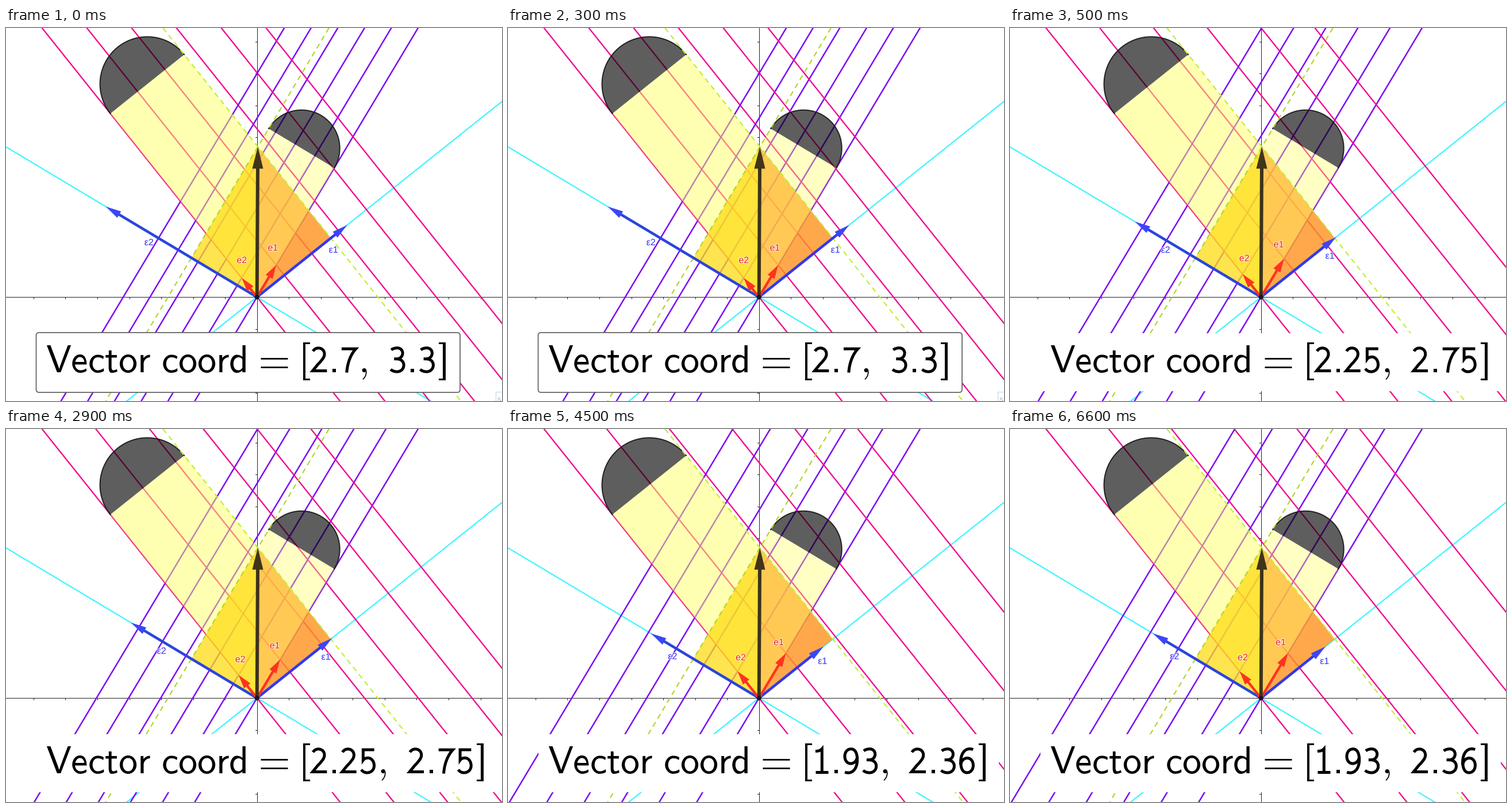
These frames come from a looping animation (863x649 px, 8 s). A matplotlib script:

```python
import numpy as np
import matplotlib.pyplot as plt
from matplotlib.animation import FuncAnimation
from matplotlib.patches import (Circle, FancyBboxPatch, PathPatch, Polygon,
                                Rectangle, Wedge)
from matplotlib.path import Path
from matplotlib.patheffects import withStroke

W, H, DPI = 863, 649, 64
PT = 72 / DPI                     # points per pixel
UNIT = 55.55                      # pixels per axis unit
EM = 66                           # size of the caption
BASE = 599                        # baseline of the caption

plt.rcParams["mathtext.fontset"] = "cm"

O = np.array([436.7, 468.2])
V = np.array([1.5, -261.5])
# Basis at scale 1 and its dual, in screen directions
EPS1, EPS2 = np.array([157, -125.4]), np.array([-263, -157.4])
DUAL = 0.2122
E1 = DUAL * np.array([-EPS2[1], EPS2[0]])
E2 = DUAL * np.array([EPS1[1], -EPS1[0]])

PINK, PURPLE, CYAN = "#f2058f", "#7a0bf5", "#3df6ff"

# Pen strokes of the sans digits in 1/1000 em: a pair is a line, six are a curve
SIX = [[(412, 625), (380, 640, 350, 643, 320, 643), (180, 643, 85, 500, 85, 300),
        (85, 130, 140, 16, 250, 16), (350, 16, 415, 100, 415, 210),
        (415, 320, 350, 400, 260, 400), (165, 400, 95, 320, 87, 230)]]
DIGITS = {
    "1": [[(90, 582), (170, 582, 225, 600, 262, 645), (262, 32)], [(95, 32), (425, 32)]],
    "2": [[(78, 555), (110, 610, 160, 638, 220, 638), (315, 638, 380, 570, 380, 480),
           (380, 380, 290, 295, 200, 200), (68, 38), (445, 38)]],
    "3": [[(85, 590), (130, 627, 190, 641, 245, 641), (330, 641, 385, 580, 385, 505),
           (385, 420, 320, 353, 235, 353), (160, 353)],
          [(235, 353), (340, 350, 415, 285, 415, 190), (415, 80, 330, 15, 240, 15),
           (170, 15, 110, 38, 68, 75)]],
    "5": [[(415, 620), (122, 620), (122, 345), (150, 388, 200, 404, 250, 404),
           (345, 404, 412, 310, 412, 200), (412, 90, 330, 15, 225, 15),
           (160, 15, 110, 45, 72, 95)]],
    "6": SIX,
    "7": [[(55, 618), (430, 618), (300, 480, 205, 250, 190, -8)]],
    # a six turned by half a circle
    "9": [[tuple(500 - v if j % 2 == 0 else 656 - v for j, v in enumerate(part))
           for part in SIX[0]]],
}

fig = plt.figure(figsize=(W / DPI, H / DPI), dpi=DPI, facecolor="white")
ax = fig.add_axes([0, 0, 1, 1])


def rgb(*c):
    return tuple(v / 255 for v in c)


def unit(v):
    return v / np.hypot(*v)


def seg(p, q, color, width, z, **kw):
    ax.plot([p[0], q[0]], [p[1], q[1]], color=color, lw=width * PT, zorder=z, **kw)


def line(p, direction, color, width, z):
    d = unit(direction) * 1500
    seg(p - d, p + d, color, width, z)


def dashed(direction, color):
    # starts at the top edge so that the dashes keep their phase
    p = O + V
    start = p - direction * (p[1] / direction[1])
    end = p + direction * ((H - p[1]) / direction[1])
    seg(start, end, color, 2.2, 6, dashes=(4.1, 3.2))


def fill(points, color, alpha, z):
    ax.add_patch(Polygon(points, fc=color, alpha=alpha, lw=0, zorder=z))


def arrow(vec, shaft, head, width, length, half, z):
    u = unit(vec)
    n = np.array([-u[1], u[0]]) * half
    tip = O + vec
    back = tip - u * length
    seg(O, back + u * 2, shaft, width, z, solid_capstyle="butt")
    ax.add_patch(Polygon([tip, back + n, back - n], fc=head, lw=0, zorder=z))


def label(s, vec, offset, color):
    x, y = O + vec / 2 + offset
    ax.text(x, y, s, color=color, family="Liberation Sans", fontsize=16 * PT,
            zorder=12, path_effects=[withStroke(linewidth=2.5, foreground=(1, 1, 1, 0.8))])


def math(x, s):
    ax.text(x, BASE, f"${s}$", fontsize=EM * PT, color="black", zorder=22)


def number(x, s):
    """Writes a decimal number and returns where it ends."""
    for ch in s:
        if ch == ".":
            ax.add_patch(Rectangle((x + 0.09 * EM, BASE - 0.098 * EM), 0.098 * EM,
                                   0.098 * EM, fc="black", lw=0, zorder=22))
            x += 0.278 * EM
            continue
        for stroke in DIGITS[ch]:
            pts = np.concatenate([np.reshape(part, (-1, 2)) for part in stroke])
            codes = [Path.MOVETO]
            for part in stroke[1:]:
                codes += [Path.LINETO] if len(part) == 2 else [Path.CURVE4] * 3
            pts = (x, BASE) + pts * (EM / 1000, -EM / 1000)
            ax.add_patch(PathPatch(Path(pts, codes), fc="none", ec="black", lw=5 * PT,
                                   capstyle="butt", joinstyle="miter", zorder=22))
        x += 0.5 * EM
    return x


def bracket(x, flip):
    pts = np.array([(0, 0), (12, 0), (12, 3.2), (4.6, 3.2), (4.6, 62.8),
                    (12, 62.8), (12, 66), (0, 66)])
    if flip:
        pts[:, 0] = 12 - pts[:, 0]
    fill(pts + (x, BASE - 52), "black", 1, 22)


def axes_lines():
    seg((0, O[1]), (W, O[1]), "#222222", 1, 2)
    seg((O[0], 0), (O[0], H), "#222222", 1, 2)
    for k in range(-8, 9):
        x, y = O + k * UNIT
        if k:
            seg((x, O[1]), (x, O[1] + 3), "#222222", 1, 2)
            seg((O[0] - 3, y), (O[0], y), "#222222", 1, 2)


def lamp(eps, dual, reach, color, alpha, z, sides):
    """Beam from the vector onto one axis, with its half-disc lamp."""
    foot = unit(eps) * (V @ unit(eps))
    far = unit(dual) * reach
    fill([O, O + foot, O + foot + far, O + far], color, alpha, z)
    c, r = O + far + foot / 2, np.hypot(*foot) / 2
    a0 = np.degrees(np.arctan2(foot[1], foot[0])) + sides
    ax.add_patch(Wedge(c, r, a0, a0 + 180, fc="black", alpha=0.63, lw=0, zorder=5))
    t = np.radians(np.linspace(a0, a0 + 180, 80))
    ax.plot(c[0] + r * np.cos(t), c[1] + r * np.sin(t),
            color="#222222", lw=2 * PT, zorder=5)
    return foot


def caption(k):
    a, b = (f"{round(v / k, 2):g}" for v in (2.7, 3.3))
    math(69, r"\mathsf{Vector}")
    math(270, r"\mathsf{coord}")
    for y in (0.36, 0.14):
        seg((443, BASE - y * EM), (489.5, BASE - y * EM), "black", 2.7, 22,
            solid_capstyle="butt")
    bracket(516.5, False)
    comma = number(529, a)
    math(comma, "{,}")
    end = number(comma + 0.778 * EM, b)
    bracket(end + 3.5, True)
    if k == 1:
        ax.add_patch(FancyBboxPatch((52.5, 530), end + 41 - 52.5, 104,
                                    boxstyle="round,pad=0,rounding_size=5",
                                    fc="white", ec="#666666", lw=1.8 * PT, zorder=20))
    else:
        ax.add_patch(Rectangle((53, 531), end + 39 - 53, 101, fc="white", lw=0, zorder=20))


def scale_at(i):
    return 1 if i < 1 else 1.2 if i < 9 else 1.4


def draw(i):
    k = scale_at(i)
    ax.clear()
    ax.set_xlim(0, W)
    ax.set_ylim(H, 0)
    ax.axis("off")

    e1, e2, eps1, eps2 = E1 * k, E2 * k, EPS1 / k, EPS2 / k
    axes_lines()
    line(O, eps1, CYAN, 2.2, 1)
    line(O, eps2, CYAN, 2.2, 1)
    for n in range(6):
        line(O + n * e2, e1, PURPLE, 2.5, 3)
        line(O + n * e1, e2, PINK, 2.3, 3)

    # Beams and the triangles between vector and axes
    f1 = lamp(EPS1, E2, 408.8, rgb(255, 255, 100), 0.5, 4, 180)
    fill([O, O + f1, O + V], rgb(255, 110, 8), 0.6, 4.1)
    f2 = lamp(EPS2, E1, 262, rgb(255, 255, 100), 0.38, 4.2, 0)
    fill([O, O + f2, O + V], rgb(254, 211, 0), 0.6, 4.3)
    dashed(E2, "#bff032")
    dashed(E1, "#b3d62c")

    arrow(eps1, "#3338ec", "#3c46f5", 4.6, 27, 6.5, 8)
    arrow(eps2, "#2a45dd", "#3c46f5", 4.6, 27, 6.5, 8)
    arrow(e1, "#ff3320", "#ff3320", 4.4, 24, 7, 9)
    arrow(e2, "#ff3320", "#ff3320", 4.4, 24, 7, 9)
    arrow(V, "#3d3218", "#40341a", 6, 38, 9.5, 10)
    ax.add_patch(Circle(O, 4, fc="#15152a", lw=0, zorder=11))

    label("ε1", eps1, (46.5, -14.5), "#3a3cf5")
    label("ε2", eps2, (-64.5, -11.5), "#3a3cf5")
    label("e1", e1, (2, -53), "#f02020")
    label("e2", e2, (-22, -42.5), "#f02020")

    if k == 1:
        ax.add_patch(Rectangle((851.5, 632.5), 30, 30, fc="white", ec="#b9d3ea",
                               lw=PT, zorder=18))
        ax.text(855, 650, "s", family="Liberation Sans", fontsize=13 * PT,
                color="#a9b4c0", zorder=19, clip_on=True)
    caption(k)
    return []


anim = FuncAnimation(fig, draw, frames=16, init_func=lambda: draw(0),
                     interval=500, repeat=True, repeat_delay=0, blit=False)
plt.show()
```
